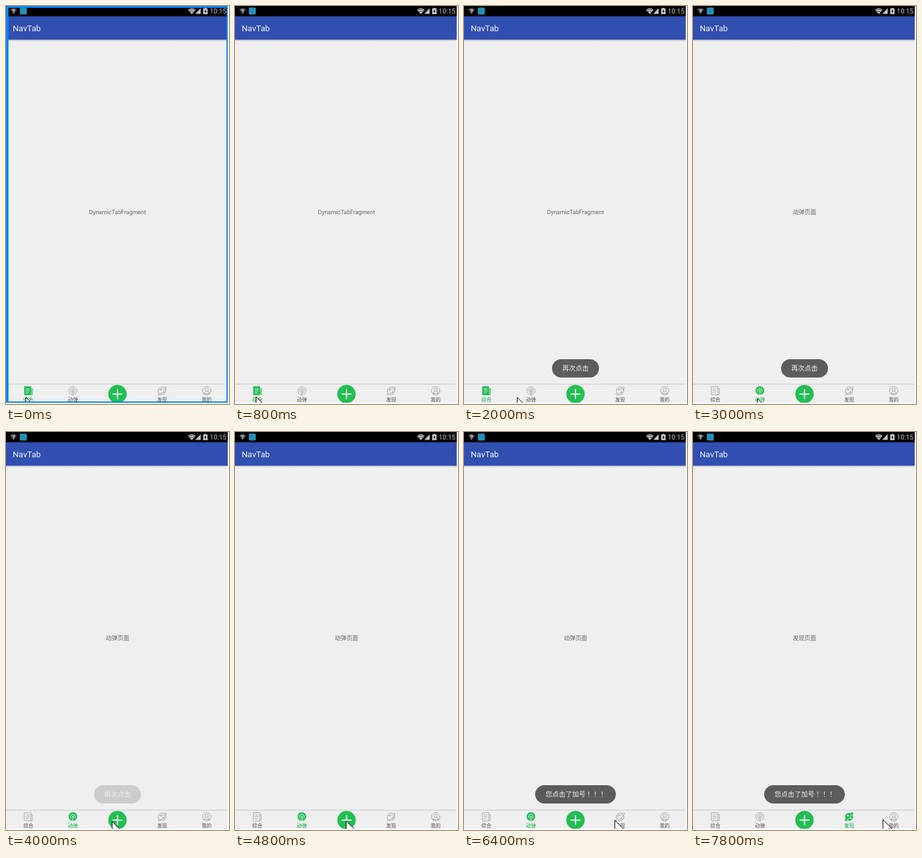
These frames come from a looping animation (354x631 px, 8000 ms). An HTML page:

```html
<!DOCTYPE html>
<html lang="zh-CN">
<head>
<meta charset="utf-8">
<title>NavTab</title>
<style>
  html, body { margin: 0; width: 100%; height: 100%; overflow: hidden; background: #fff; }
  svg { display: block; width: 354px; height: 631px; }
  text { font-family: Roboto, "Noto Sans CJK SC", "Noto Sans CJK", sans-serif; }
  .mid { text-anchor: middle; }
  .wide { font-family: "Noto Sans CJK TC", "Noto Sans CJK", sans-serif; }
  .icon { fill: none; stroke: #8f8f8f; stroke-width: .75; }
  .tab text { font-size: 7.9px; fill: #4c4c4c; }
  .tab .on { display: none; }
  .tab.sel .on { display: inline; }
  .tab.sel .off { display: none; }
  .tab.sel text { fill: #00ab34; }
  .on { fill: #1fc055; }
  .cut { fill: none; stroke: #efefef; }
  .hole { fill: #efefef; }
</style>
</head>
<body>
<svg viewBox="0 0 354 631">
  <defs>
    <clipPath id="screen"><rect width="352" height="629"/></clipPath>
    <linearGradient id="shade" x2="0" y2="1">
      <stop stop-color="#b4b4ba"/><stop offset="1" stop-color="#efefef"/>
    </linearGradient>
  </defs>
  <g clip-path="url(#screen)">
    <rect width="354" height="631" fill="#efefef"/>
    <rect y="53" width="354" height="3" fill="url(#shade)"/>
    <rect y="16" width="354" height="37.4" fill="#304fb0"/>
    <rect width="354" height="16.3"/>

    <!-- status bar -->
    <path d="M6.5 5.5Q12 1.5 17.5 5.5L12 12.5Z" fill="#555"/>
    <text class="mid" x="12" y="11.5" font-size="9" font-weight="700" fill="#ccc">?</text>
    <rect x="22" y="2.5" width="11" height="11" rx="1.5" fill="#2390b8"/>
    <g fill="#c4c4c4">
      <path d="M289 6Q295 1 301 6L295 13ZM309 3.5V12.500H300.500ZM313 4H315V3H318V4H320V13H313Z"/>
      <text x="323.5" y="12" font-size="10.6">10:15</text>
    </g>
    <path d="M290.500 7Q295 3.800 299.500 7M292.300 9.200Q295 7.300 297.700 9.200" fill="none" stroke="#000" stroke-width=".7"/>
    <path d="M317.300 5L314.700 9H316.300L315.800 11.800L318.400 7.800H316.800Z"/>

    <text x="10.7" y="40" font-size="13.2" fill="#f4f5fa">NavTab</text>
    <text id="page" class="mid" x="177" y="330" font-size="9.25" fill="#686868"></text>

    <!-- bottom bar -->
    <rect y="599" width="354" height="1" fill="#cbcbcb"/>
    <g class="tab">
      <g class="icon off">
        <path d="M-6.300-6.500H4V6.500H-5Q-6.300 6.500-6.300 5ZM4-3.500H6.300V5Q6.300 6.500 5 6.500H3"/>
        <path d="M-4-3H2M-4 0H2M-4 3H0"/>
      </g>
      <g class="on">
        <path d="M-6.500-7H4.500V7H-5Q-6.500 7-6.500 5.500ZM5.200-4H6.800V5.500Q6.800 7 5.200 7Z"/>
        <path class="cut" d="M-4-3H2M-4 0H2M-4 3H0"/>
      </g>
      <text class="mid" y="16.7">综合</text>
    </g>
    <g class="tab">
      <g class="icon off">
        <path d="M-2.500 5.900A6.500 6.500 0 1 1 2.500 5.900M-2 2.700A3.700 3.700 0 1 1 2 2.700"/>
        <circle cy="-.5" r="1.400"/><path d="M-.8 1L-1.300 6.800H1.300L.8 1"/>
      </g>
      <g class="on">
        <circle cy="-.3" r="6.900"/>
        <path class="cut" d="M-2 2.700A3.700 3.700 0 1 1 2 2.700M0 1V6"/>
        <circle class="hole" cy="-.5" r="1.300"/>
      </g>
      <text class="mid" y="16.7">动弹</text>
    </g>
    <g class="tab">
      <circle cy="5.3" r="14.6" fill="#21bf52"/>
      <path d="M-8 5.300H8M0-2.700V13.300" stroke="#fff" stroke-width="1.8"/>
    </g>
    <g class="tab">
      <g class="icon off">
        <circle r="6"/>
        <path d="M3.500-5Q7-7.500 6.700-4.500Q4 2-4.500 6.500Q-7.500 7-5.200 3.300"/>
        <circle cx="-2" cy="-2" r="1.300"/><circle cx="2.600" cy="2.800" r=".9"/><circle cx="1.500" cy="-2.800" r=".6"/>
      </g>
      <g class="on">
        <circle r="6.300"/><path d="M2-6Q7-8 7-5L5-2ZM-2 6Q-7 8-7 5L-5 2Z"/>
        <path class="cut" d="M6-4.500Q2 2-4.500 5.700"/>
        <g class="hole"><circle cx="-2" cy="-2" r="1.400"/><circle cx="3" cy="2.600" r="1"/><circle cx="1.700" cy="-3" r=".8"/></g>
      </g>
      <text class="mid" y="16.7">发现</text>
    </g>
    <g class="tab">
      <g class="icon">
        <circle r="6.600"/><circle cy="-1.500" r="2.500"/>
        <path d="M-4.500 4.700Q-4 1.800-1.500 1.500M4.500 4.700Q4 1.800 1.500 1.500M-4.500 4.500H4.500"/>
      </g>
      <text class="mid" y="16.7">我的</text>
    </g>

    <g id="toast">
      <rect id="pill" y="560" height="29" rx="14.5" fill="#5c5c5c"/>
      <text class="mid" x="177" y="578.3" font-size="10.56" fill="#f2f2f2"><tspan id="msg"></tspan><tspan id="bang" class="wide" lang="zh-TW"></tspan></text>
    </g>
    <path id="cursor" d="M.5.500V21.500L5.300 17L8.300 24H11.500L8.500 16.500V15H15Z" fill="#fff" stroke="#000"/>
    <path id="frame" d="M0 0H352V629H0ZM4 3V627H350V3Z" fill="#0a84f2" fill-rule="evenodd"/>
  </g>
</svg>
<script>
const $ = id => document.getElementById(id);
const STEP = 200, LOOP = 8000, FADE = 500;

const tabs = [...document.querySelectorAll('.tab')];
tabs.forEach((tab, i) => tab.setAttribute('transform', `translate(${35.4 + 70.8 * i} 610)`));

const pages = [
  { from: 0, tab: 0, text: 'DynamicTabFragment' },
  { from: 2800, tab: 1, text: '动弹页面' },
  { from: 6800, tab: 3, text: '发现页面' }
];
const toasts = [
  { from: 1240, to: 3740, width: 74.5, msg: '再次点击', bang: '' },
  { from: 5040, to: LOOP, width: 128, msg: '您点击了加号', bang: '！！！' }
];
// cursor stops: time, x, y
const stops = [
  [600, 31, 620], [1000, 35, 618], [1200, 35, 618], [2400, 101, 621], [3200, 102, 622],
  [4000, 168, 617], [5200, 179, 615], [6400, 239, 615], [7200, 254, 614], [7800, 301, 614]
];

const clamp = u => Math.min(1, Math.max(0, u));
const easeOut = u => 1 - (1 - clamp(u)) ** 2;
const smooth = u => u * u * (3 - 2 * u);

function cursorAt(t) {
  const i = Math.max(1, stops.findIndex(s => s[0] >= t));
  const [a, b] = [stops[i - 1], stops[i]];
  const u = smooth(clamp((t - a[0]) / (b[0] - a[0])));
  return [1, 2].map(k => Math.round(a[k] + (b[k] - a[k]) * u));
}

function draw(now) {
  const t = Math.floor(now % LOOP / STEP) * STEP;
  const page = pages.findLast(p => p.from <= t);
  tabs.forEach((tab, i) => tab.classList.toggle('sel', i === page.tab));
  $('page').textContent = page.text;

  const toast = toasts.findLast(s => s.from <= t) || toasts[0];
  $('pill').setAttribute('x', 177 - toast.width / 2);
  $('pill').setAttribute('width', toast.width);
  $('msg').textContent = toast.msg;
  $('bang').textContent = toast.bang;
  $('toast').setAttribute('opacity',
    easeOut((t - toast.from) / FADE) - easeOut((t - toast.to) / FADE));

  $('cursor').setAttribute('transform', `translate(${cursorAt(t)})`);
  $('frame').style.display = t < STEP ? '' : 'none';
}

const start = performance.now();
function tick() {
  draw(performance.now() - start);
  requestAnimationFrame(tick);
}
tick();
</script>
</body>
</html>
```
